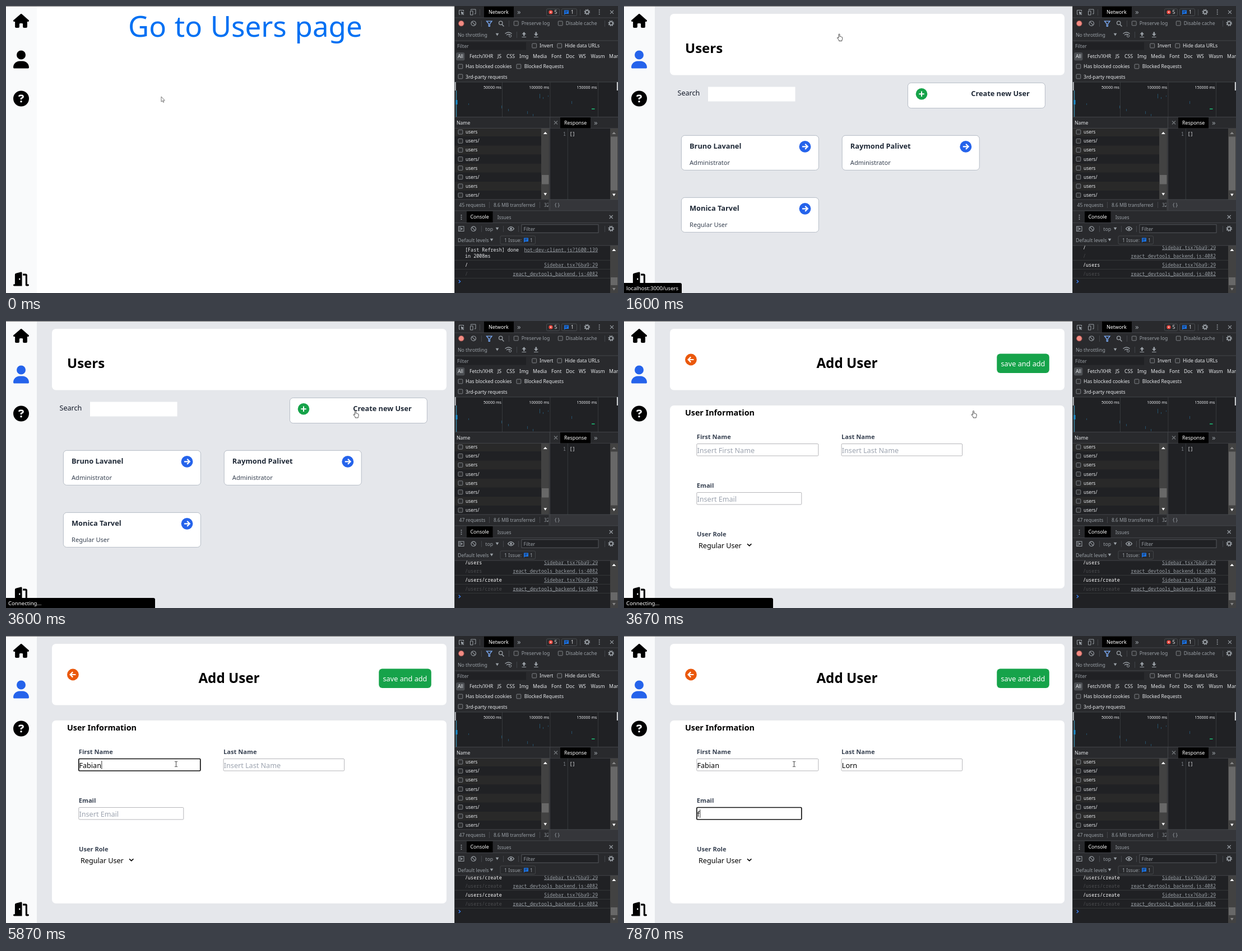
An HTML page that plays this animation: 1092 by 513 pixels, repeating every 8 s.

```html
<!DOCTYPE html>
<html lang="en">
<head>
<meta charset="utf-8">
<title>Users admin</title>
<style>
html, body { margin: 0; width: 100%; height: 100%; overflow: hidden; background: #fff; }
svg { display: block; width: 100%; height: 100%; }
text { font-family: "Noto Sans", "Open Sans", sans-serif; white-space: pre; }
.b { font-weight: 700; }
.m { font-family: "Noto Sans Mono", "DejaVu Sans Mono", monospace; }
.u { text-decoration: underline; }
.e { text-anchor: end; }
.c { text-anchor: middle; }
.big { word-spacing: .03em; }
</style>
</head>
<body>
<svg id="stage" viewBox="0 0 1092 513"></svg>
<script>
const GREY = '#9aa0a6', LIGHT = '#e8eaed', BAR = '#292a2d', DARK = '#202124', EDGE = '#494c50',
  TRACK = '#424242', THUMB = '#686868', BLUE = '#2563eb', GREEN = '#16a34a';

const text = (x, y, s, size = 8.7, fill = GREY, cls = '', id = '') =>
  `<text x="${x}" y="${y}" font-size="${size}" fill="${fill}" class="${cls}" id="${id}">${s}</text>`;
const rect = (x, y, w, h, fill, r = 0, more = '') =>
  `<rect x="${x}" y="${y}" width="${w}" height="${h}" fill="${fill}" rx="${r}" ${more}/>`;
const disc = (x, y, r, fill, more = '') => `<circle cx="${x}" cy="${y}" r="${r}" fill="${fill}" ${more}/>`;
const line = (d, stroke = GREY, w = 1.1) => `<path d="${d}" fill="none" stroke="${stroke}" stroke-width="${w}"/>`;
const fill = (d, color, more = '') => `<path d="${d}" fill="${color}" ${more}/>`;
const group = (id, body) => `<g id="${id}">${body}</g>`;
const hr = y => rect(800, y, 292, .8, EDGE);
const seps = (y, ...xs) => xs.map(x => rect(x, y - 5, .8, 11, EDGE)).join('');
const box = (x, y) => rect(x + .3, y - 3.9, 7.8, 7.8, '#2d2e30', 1, 'stroke="#8a8d91" stroke-width=".9"');
const gear = (x, y) => disc(x, y, 3, 'none', `stroke="${GREY}" stroke-width="1.7"`) +
  disc(x, y, 4.5, 'none', `stroke="${GREY}" stroke-width="1.6" stroke-dasharray="1.77"`);
const cross = (x, y, c = GREY) => line(`M${x - 3} ${y - 3}l6 6m0-6l-6 6`, c);
const kebab = (x, y) => [-3.6, 0, 3.6].map(d => disc(x, y + d, 1, GREY)).join('');
const block = (x, y) => disc(x, y, 4.2, 'none', `stroke="${GREY}" stroke-width="1.2"`) + line(`M${x - 3} ${y - 3}l6 6`);
const down = (x, y, c = GREY) => fill(`M${x - 2.8} ${y - 2}h5.6l-2.8 4.6z`, c);
const up = (x, y, c) => fill(`M${x - 3.5} ${y + 2}h7l-3.5-4z`, c);
const chat = (x, y) => fill(`M${x} ${y - 4}h8v6.5h-6l-2 2z`, '#1a73e8') + line(`M${x + 1.5} ${y - 2}h5m-5 2h3.5`, DARK, .8);

// ---------- web page ----------
const card = (x, y, w, h, r = 7, more = '') => rect(x, y, w, h, '#fff', r, more);
const outline = 'stroke="#a8afba" stroke-width=".8"';
const arrow = (x, y, color, dir) => disc(x, y, 10.4, color) +
  line(`M${x - 5 * dir} ${y}h${9.5 * dir}m${-4.3 * dir}-4.6l${4.6 * dir} 4.6l${-4.6 * dir} 4.6`, '#fff', 2.2);
const person = (x, y, name, role) => card(x + .4, y + .4, 245, 62, 6, outline) +
  text(x + 15, y + 24, name, 12.8, '#1f2937', 'b') + text(x + 15, y + 52.5, role, 11.1, '#374151') +
  arrow(x + 221, y + 20.3, BLUE, 1);

const home = rect(55, 1, 745, 512, '#fff') + text(218, 55, 'Go to Users page', 51, '#0070f3', 'big') +
  group('under', [[219, 295], [531, 43], [607, 28.5]].map(([x, w]) => rect(x, 58.3, w, 4.5, '#0070f3')).join(''));

const backdrop = rect(55, 1, 745, 512, '#e5e7eb') + card(82, 14, 704, 109.5);

const users = backdrop + text(109, 84, 'Users', 24, '#000', 'b') +
  text(95.5, 160, 'Search', 12.6, '#111827') + rect(150, 144.5, 155.5, 26, '#fff') +
  card(506.4, 137.4, 245, 45.2, 6, outline) + disc(531, 157.3, 10.3, GREEN) +
  line('M526.3 157.3h9.4m-4.7-4.7v9.4', '#fff', 2) +
  text(619.3, 161, 'Create new User', 12.75, '#1f2937', 'b') +
  person(102, 231, 'Bruno Lavanel', 'Administrator') +
  person(388.8, 231, 'Raymond Palivet', 'Administrator') +
  person(102, 342, 'Monica Tarvel', 'Regular User');

const fields = [
  { x: 129.5, y: 219, w: 217, label: 'First Name', hint: 'Insert First Name', value: 'Fabian', keys: [5330, 5470, 5600, 5600, 5730, 5870], focus: 4800 },
  { x: 387.8, y: 219, w: 215.5, label: 'Last Name', hint: 'Insert Last Name', value: 'Lorn', keys: [6670, 6770, 6860, 6930], focus: 6200 },
  { x: 129.5, y: 306, w: 187, label: 'Email', hint: 'Insert Email', value: 'f', keys: [7870], focus: 7070 }
];
const form = backdrop + arrow(119.4, 69, '#ea580c', -1) + text(398, 84, 'Add User', 24.2, '#000', 'b c') +
  rect(665.3, 58.5, 93.5, 34.5, GREEN, 6) + text(712, 81, 'save and add', 12.7, '#fff', 'c') +
  card(82, 151, 704, 327) + text(109, 168.6, 'User Information', 14.3, '#000', 'b') +
  fields.map(({ x, y, w, label }, i) => text(x + .3, y - 8, label, 11.1, '#374151', 'b') +
    rect(x + .3, y + .5, w, 21.5, '#fff', 1.5, `id="field${i}"`) + text(x + 1, y + 17, '', 12.6, '#000', '', 'value' + i)).join('') +
  rect(0, 0, .8, 15, '#000', 0, 'id="caret"') +
  text(130, 385, 'User Role', 11.1, '#374151', 'b') + text(133, 405.5, 'Regular User', 12.6, '#000') +
  line('M220 398.4l3.7 3.5 3.7-3.5', '#000', 1.5);

const icon = (y, scale, d, id = '') => fill(d, '#000', `id="${id}" fill-rule="evenodd" transform="translate(13 ${y}) scale(${scale})"`);
const sidebar = rect(0, 1, 55, 512, '#f9fafb') +
  icon(14, .0486, 'M575.8 255.5c0 18-15 32.1-32 32.1h-32l.7 160.2c0 2.7-.2 5.4-.5 8.1V472c0 22.1-17.9 40-40 40H392c-22.1 0-40-17.9-40-40V384c0-17.7-14.3-32-32-32H256c-17.7 0-32 14.3-32 32v88c0 22.1-17.9 40-40 40H104c-22.1 0-40-17.9-40-40V287.6H32c-18 0-32-14-32-32.1 0-9 3-17 10-24L266.4 8c7-7 15-8 22-8s15 2 21 7L564.8 231.5c8 7 12 15 11 24z') +
  icon(79.5, .0625, 'M224 256A128 128 0 1 0 224 0a128 128 0 1 0 0 256zm-45.7 48C79.8 304 0 383.8 0 482.3 0 498.7 13.3 512 29.7 512H418.3c16.4 0 29.7-13.3 29.7-29.7C448 383.8 368.2 304 269.7 304z', 'user') +
  icon(151.5, .0547, 'M256 512A256 256 0 1 0 256 0a256 256 0 1 0 0 512zM169.8 165.3c7.9-22.3 29.1-37.3 52.8-37.3h58.3c34.9 0 63.1 28.3 63.1 63.1 0 22.6-12.1 43.5-31.7 54.8L280 264.4c-.2 13-10.9 23.6-24 23.6-13.3 0-24-10.7-24-24V250.5c0-8.6 4.6-16.5 12.1-20.8l44.3-25.4c4.7-2.7 7.6-7.7 7.6-13.1 0-8.4-6.8-15.1-15.1-15.1H222.6c-3.4 0-6.4 2.1-7.5 5.3l-.4 1.2c-4.4 12.5-18.2 19-30.6 14.6s-19-18.2-14.6-30.6zM224 352a32 32 0 1 1 64 0 32 32 0 1 1-64 0z') +
  icon(475.5, .0486, 'M320 32c0-22-18-36-40-31L100 46C77 52 60 73 60 97V448H32c-42 0-42 64 0 64H320ZM232 288c-32 0-32-64 0-64s32 64 0 64ZM352 128h96V480q0 32 32 32h64c42 0 42-64 0-64H512V128q0-64-64-64H352z');

// ---------- developer tools ----------
const tab = (x, y, w, h, s, tx) => rect(x, y, w, h, '#000') + text(tx, y + 13, s, 8.9, '#fff');
const types = [[806, 'All'], [827, 'Fetch/XHR'], [877, 'JS'], [893, 'CSS'], [916, 'Img'], [940, 'Media'],
  [973, 'Font'], [999, 'Doc'], [1022, 'WS'], [1043.5, 'Wasm'], [1076, 'Manifest']];
const marks = [[825, 174, 3], [884, 178, 5], [896, 184, 4], [930, 188, 5], [940, 193, 4], [952, 157, 8],
  [958, 163, 3], [967, 160, 2], [1009, 170, 5]];

const network = rect(800, 0, 292, 513, BAR) +
  // tab bar
  line('M808.5 12v-4.5h8V10M808.5 12v3h2', GREY, 1) + fill('M811.5 9.5l6.5 2.7-2.7 1.1 2 2-1 1-2-2-1 2.4z', GREY) +
  line('M829.5 7.5V6h8.5v8h-2M828.5 9h4.5v7h-4.5z', GREY, 1) + seps(11, 845, 1024) +
  tab(853, 1, 53, 19.5, 'Network', 861) + text(912, 15, '»', 13) +
  rect(964.5, 5, 23, 12.5, 'none', 2, `stroke="${EDGE}"`) + disc(972, 11, 3.6, '#e8453c') +
  line('M970.7 9.7l2.6 2.6m0-2.6l-2.6 2.6', '#fff', .8) + text(978.5, 14.2, '5', 8.7, LIGHT) +
  rect(991.5, 5, 27, 12.5, 'none', 2, `stroke="${EDGE}"`) + chat(996, 11.5) + text(1008, 14.2, '1', 8.7, LIGHT) +
  gear(1036.8, 10.8) + kebab(1058.7, 10.8) + cross(1081, 10.8) + hr(20.6) +
  // recording tools
  disc(812.3, 31.2, 5.4, '#8c4a48') + disc(812.3, 31.2, 4.4, '#f28b82') + block(834.2, 31.2) + seps(31, 848, 897, 1068) +
  line('M857.5 27.2h9.5l-3.7 4.6v4.6h-2v-4.6z', '#7cacf8', 1.3) +
  line('M885 33l3.4 3.5', GREY, 1.5) + disc(882.7, 30.3, 3.2, 'none', `stroke="${GREY}" stroke-width="1.3"`) +
  box(906, 31) + text(919.7, 34.3, 'Preserve log') + box(985, 31) + text(998.7, 34.3, 'Disable cache') + gear(1079.7, 31) +
  text(806, 54.5, 'No throttling') + down(876.5, 50.8) + seps(51, 911) +
  line('M890.5 49.5q6-5 12 0m-9.5 2.6q3.5-3 6.5-.5', GREY, 1.3) + disc(899.6, 53.5, 2.1, 'none', `stroke="${GREY}"`) +
  fill('M924.3 46.3l3.8 4.2h-2.5v3h-2.6v-3h-2.5zM920.5 55h7.6v1h-7.6zM945.8 54l-3.8-4.2h2.5v-3.2h2.6v3.2h2.5zM942 55h7.6v1h-7.6z', GREY) +
  hr(61.5) +
  // filters
  rect(803, 64.5, 125, 14, DARK) + text(805, 74.7, 'Filter') +
  box(938.5, 71) + text(952, 74.4, 'Invert', 8.7, LIGHT) + box(983.5, 71) + text(997, 74.4, 'Hide data URLs', 8.7, LIGHT) +
  rect(803, 83, 15.5, 14.5, '#4a4d51', 3) + types.map(([x, s]) => text(x, 93.3, s, 8.7, LIGHT)).join('') +
  box(806.7, 108) + text(820, 111.3, 'Has blocked cookies', 8.7, LIGHT) + box(910.7, 108) +
  text(924.7, 111.3, 'Blocked Requests', 8.5, LIGHT) + box(806.7, 126) + text(820, 129.5, '3rd-party requests', 8.6, LIGHT) +
  // timeline
  rect(800, 136, 292, 62, DARK) + hr(135.5) +
  [50, 100, 150].map((n, i) => rect(885.2 + i * 85.4, 136, .8, 62, '#3c4043') +
    text(884 + i * 85.2, 147.5, n + '000 ms', 7.05, LIGHT, 'e')).join('') +
  rect(800.5, 136, 2.2, 15, '#c4c7ca') + rect(1089.8, 136, 2.2, 15, '#c4c7ca') +
  rect(801.5, 151, .8, 47, '#555') + rect(803, 151, 1.2, 47, '#3c8fb0') + rect(802.5, 168, 3, 8, '#1a8fd0') +
  marks.map(([x, y, h]) => rect(x, y, 1, h, '#24506a')).join('') + rect(1045, 183, 5.5, 2, '#1d9a63') +
  // request list
  rect(800, 218, 170, 128, DARK) +
  Array.from({ length: 8 }, (_, i) => {
    const y = 225.2 + i * 16.13;
    return rect(800, y - 8, 155, 16.1, i % 2 ? DARK : '#292929') + box(806.7, y) +
      text(820, y + 3, 'users' + (i % 2 ? '/' : ''), 8.4, LIGHT);
  }).join('') +
  rect(955, 218.5, 14.5, 127, TRACK) + up(962.3, 227, '#fff') + down(962.3, 336.2, '#fff') +
  rect(956, 302, 12.5, 16.5, THUMB, 0, 'id="thumb"') +
  rect(800, 199, 292, 19, BAR) + hr(198) + hr(218) + text(804, 212, 'Name', 8.6, LIGHT) +
  // summary
  rect(800, 346, 170, 20, BAR) + text(808.5, 358.7, '', 8.55, GREY, '', 'count') +
  text(870, 358.7, '8.6 MB transferred', 8.45) + text(960, 358.7, '32.1', 8.45) + seps(355, 862, 952) +
  // response pane
  rect(968, 346, 124, 20, '#35363a') + text(978, 359, '{}', 9, GREY, 'm') +
  rect(970.5, 218.8, 121.5, 127, DARK) + rect(970, 199, .8, 166, EDGE) + cross(981, 208.5, '#74787c') +
  tab(989, 199, 54, 19.5, 'Response', 996) + text(1049, 213, '»', 13) +
  text(999, 231.5, '1', 8.44, '#80868b', 'm e') + rect(1001.8, 219, .8, 127, '#3c4043') + text(1005.5, 231.5, '[]', 8.44, LIGHT, 'm') +
  rect(1078, 219, 14, 127, TRACK) + rect(1079, 233.5, 12, 96, THUMB) + up(1084.8, 227, '#888') + down(1084.8, 337.5, '#fff') +
  hr(345.5);

const logY = [434.5, 450, 466, 481.5];
const logs = rect(800, 428, 292, 85, DARK) + [454, 470, 486].map(y => rect(800, y, 278, .8, '#3a3b3e')).join('') +
  logY.map((y, i) => group('row' + i, text(819, y, '', 8.44, i % 2 ? '#4c4d50' : '#fff', 'm', 'log' + i) +
    text(1056, y, i % 2 ? 'react_devtools_backend.js:4082' : 'Sidebar.tsx?6ba9:29', 8.44, GREY, 'm u e'))).join('') +
  group('boot', text(819, 438.5, '[Fast Refresh] done', 8.44, LIGHT, 'm') + text(819, 450, 'in 2008ms', 8.44, LIGHT, 'm') +
    text(1056, 438.5, 'hot-dev-client.js?1600:139', 8.44, GREY, 'm u e')) +
  line('M807.7 489.7l3 2.7-3 2.7', '#3b82f6', 1.3) +
  rect(1078, 428, 14, 85, TRACK) + rect(1079, 485, 12, 14, THUMB) + up(1084.8, 436, '#fff') + down(1084.8, 506, '#888');

const drawer = rect(800, 366, 292, 62, BAR) + hr(365.5) + kebab(812.5, 377.5) + tab(822, 367, 46.5, 20, 'Console', 828.5) +
  text(876.7, 380.7, 'Issues', 8.4) + cross(1079.7, 377) + hr(387.2) +
  rect(807.5, 394, 9.5, 8.5, 'none', 0, `stroke="${GREY}"`) + line('M810 394v8.5', GREY, 1) + fill('M811.7 396l3.5 2.2-3.5 2.2z', GREY) +
  block(834.2, 398.3) + seps(398, 848, 887, 914, 1068) + text(855.3, 401.5, 'top') + down(876.5, 397.8) +
  line('M895.5 398.2q5.5-7 11 0q-5.5 7-11 0z', GREY, 1.2) + disc(901, 398.2, 1.9, GREY) +
  rect(920, 390.8, 137, 14.4, DARK, 0, 'stroke="#5f6368" stroke-width=".8"') + text(923.5, 401.5, 'Filter') + gear(1079.7, 398) +
  text(806, 421.5, 'Default levels', 8.8) + down(866.5, 417.8) + rect(882, 411, 62.5, 14.5, 'none', 2, `stroke="${EDGE}" stroke-width=".8"`) +
  text(889, 421.5, '1 Issue:') + chat(924, 418.5) + text(935, 421.5, '1') + hr(427.7);

// ---------- pointers and status bubble ----------
const ink = 'stroke="#222" stroke-width=".8" stroke-linejoin="round"';
const pointers = group('arrow', fill('M0 0v9.2l2.1-1.9 1.4 3 1.4-.6-1.4-2.9h2.8z', '#fff', ink.replace('#222', '#555'))) +
  group('hand', fill('M-1 .9q0-.9 1-.9t1 .9v3.7q1.4-.7 1.7.4 1.2-.5 1.5.5 1.4-.2 1.4 1v2q0 1.5-.8 2.5v1.5h-5.2v-1.5l-2.9-3.5q-.5-1 .4-1.4.8-.2 1.9 1.2z', '#fff', ink)) +
  group('beam', line('M-2.5-4.6h1.8q.7 0 .7.7 0-.7.7-.7h1.8M0-4v8M-2.5 4.6h1.8q.7 0 .7-.7 0 .7.7.7h1.8', '#333', .9));

const stage = document.getElementById('stage');
stage.innerHTML = group('home', home) + group('users', users) + group('form', form) + sidebar +
  rect(0, 0, 800, .9, '#666') +
  group('status', fill('', '#000', 'id="bubble"') + text(4, 507.7, '', 9.6, '#fff', '', 'tip')) +
  network + logs + drawer + rect(800, 0, .7, 513, EDGE) + group('pointer', pointers);

const $ = id => document.getElementById(id);
const show = (id, on) => $(id).style.display = on ? '' : 'none';
const attrs = (id, o) => Object.entries(o).forEach(([k, v]) => $(id).setAttribute(k, v));

const path = [[0, 277, 162], [70, 277, 162], [130, 292, 154], [270, 292, 154], [400, 320, 149], [740, 320, 149],
  [1330, 383, 51], [1530, 384, 50], [1900, 384, 50], [2070, 378, 60], [2400, 595, 159], [2620, 595, 159],
  [3000, 620, 160], [3150, 620, 160], [3200, 623.5, 160.5], [3820, 623.5, 160.5], [4400, 341, 239], [4700, 303.5, 229], [8000, 303.5, 229]];
function pointerAt(t) {
  const i = path.findIndex(p => p[0] > t), [t0, x0, y0] = path[i - 1], [t1, x1, y1] = path[i];
  const k = (t - t0) / (t1 - t0), e = k * k * (3 - 2 * k);
  return [x0 + (x1 - x0) * e, y0 + (y1 - y0) * e];
}

// routes of the older and newer log pair
function routes(t) {
  if (t < 1530) return ['', '/'];
  if (t < 1930) return ['/', '/users'];
  if (t < 3600) return ['/users', '/users'];
  if (t < 5330) return ['/users', '/users/create'];
  return ['/users/create', '/users/create'];
}

function render(t) {
  const page = t < 1600 ? 'home' : t < 3670 ? 'users' : 'form';
  ['home', 'users', 'form'].forEach(p => show(p, p === page));
  attrs('user', { fill: page === 'home' ? '#000' : BLUE });

  const [x, y] = pointerAt(t);
  const overLink = t < 1930 && y < 75;
  const overButton = page === 'users' && x > 506 && y > 137 || t >= 3670 && t < 3870;
  const overField = page === 'form' && fields.some(f => x > f.x && x < f.x + f.w && y > f.y && y < f.y + 22);
  const pose = overLink || overButton ? 'hand' : overField ? 'beam' : 'arrow';
  ['arrow', 'hand', 'beam'].forEach(p => show(p, p === pose));
  attrs('pointer', { transform: `translate(${x} ${y})` });
  show('under', overLink);

  const wait = t >= 3600 && t < 3870, hover = t < 2080 && (overLink || t >= 1930);
  show('status', wait || hover);
  $('status').style.opacity = hover && t > 1930 ? 1 - (t - 1930) / 150 : 1;
  attrs('bubble', { d: `M0 495H${wait ? 263 : 100}q3 0 3 3v15H0z` });
  $('tip').textContent = wait ? 'Connecting...' : 'localhost:3000/users';

  $('count').textContent = (t < 1670 ? 45 : 47) + ' requests';
  attrs('thumb', { y: t < 1670 ? 302 : 299 });

  const pair = routes(t);
  logY.forEach((_, i) => $('log' + i).textContent = pair[i >> 1]);
  show('boot', !pair[0]);
  show('row0', pair[0]);
  show('row1', pair[0]);

  const active = fields.findLastIndex(f => t >= f.focus);
  fields.forEach((f, i) => {
    const value = f.value.slice(0, f.keys.filter(k => t >= k).length), el = $('value' + i);
    el.textContent = value || f.hint;
    el.setAttribute('fill', value ? '#000' : '#9ca3af');
    attrs('field' + i, i === active ? { stroke: '#101010', 'stroke-width': 1.7 } : { stroke: '#a3a3a8', 'stroke-width': .8 });
    if (i === active) attrs('caret', { x: f.x + 1.5 + (value ? el.getComputedTextLength() : 0), y: f.y + 4 });
  });
  show('caret', active >= 0 && !(t >= 7600 && t < 7870));
}

const start = performance.now();
function tick() {
  render((performance.now() - start) % 8000);
  requestAnimationFrame(tick);
}
tick();
</script>
</body>
</html>
```
